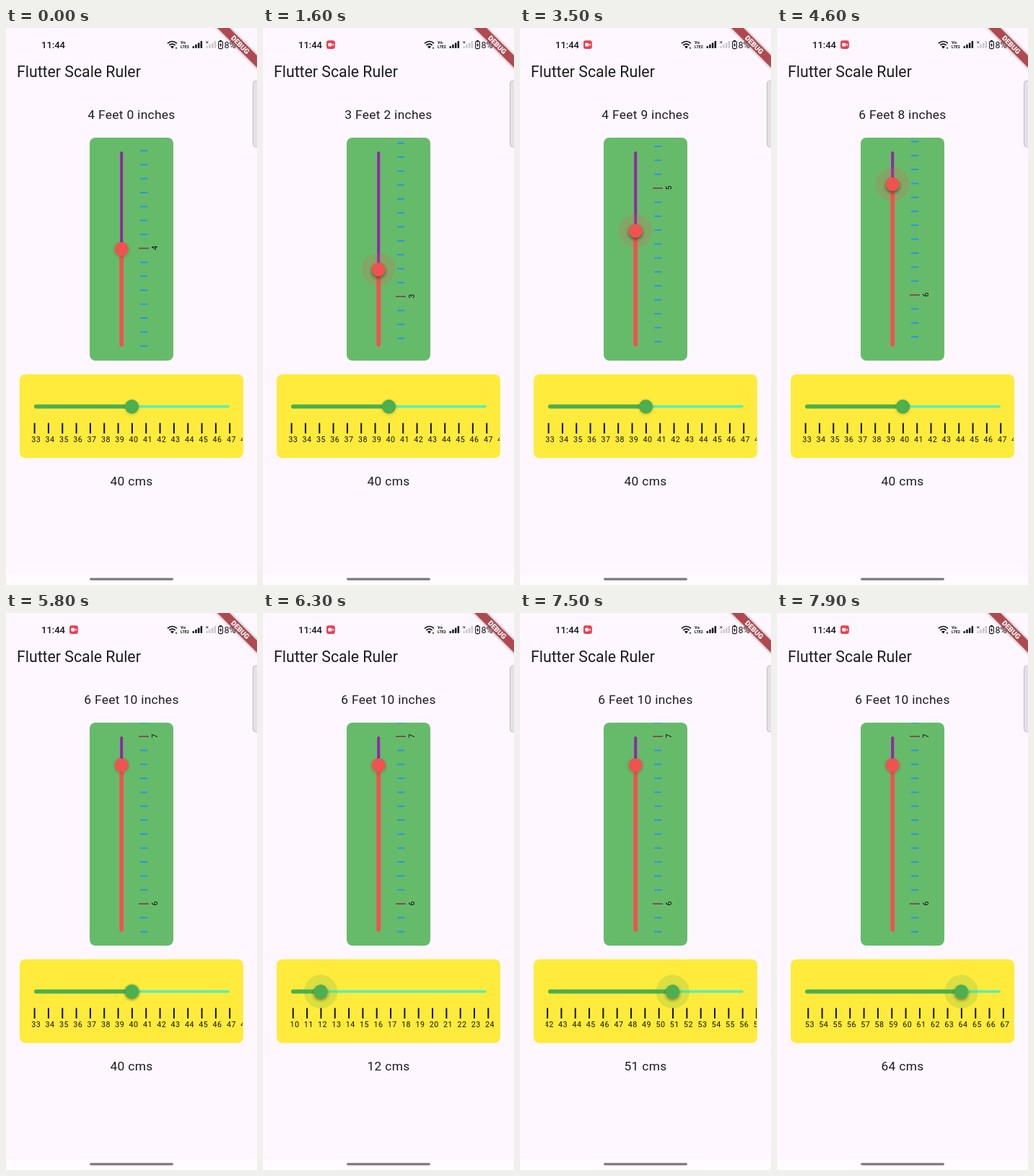
Recreate the animation shown at these times as an HTML page. Size 348 px wide and 772 px high, loop 8 s.

```html
<!DOCTYPE html>
<html lang="en">
<head>
<meta charset="utf-8">
<title>Scale ruler</title>
<style>
  html, body { margin: 0; width: 100%; height: 100%; overflow: hidden; background: #fef7ff; }
  svg { display: block; width: 348px; height: 772px; font-family: Roboto, sans-serif; }
  .value { font-size: 17.4px; letter-spacing: .3px; text-anchor: middle; fill: #1d1b20; }
  .mark { font-size: 10.7px; letter-spacing: .5px; text-anchor: middle; fill: #111; }
</style>
</head>
<body>
<svg viewBox="0 0 348 772" xmlns="http://www.w3.org/2000/svg">
  <defs>
    <clipPath id="feetClip"><rect x="116" y="152" width="116" height="292"/></clipPath>
    <clipPath id="cmClip"><rect x="35.5" y="480" width="292.5" height="116"/></clipPath>
    <filter id="blur" x="-50%" y="-50%" width="200%" height="200%"><feGaussianBlur stdDeviation="2"/></filter>
  </defs>
  <rect width="348" height="772" fill="#fef7ff"/>
  <rect y="757" width="348" height="15" fill="#fffbff"/>

  <!-- status bar -->
  <g fill="#161418">
    <text x="49" y="28.2" font-size="13" font-weight="500">11:44</text>
    <g fill="none" stroke="#161418" stroke-width="1.6">
      <path d="M224 21.4Q230.500 15.600 237 21.400M226.300 23.900Q230.500 20.200 234.700 23.900"/>
    </g>
    <path d="M228 25.800Q230.500 23.800 233 25.800L230.500 28.500Z"/>
    <circle cx="236" cy="27.800" r="1"/>
    <g font-size="5.8" font-weight="700">
      <text x="242" y="22.300">Vo</text>
      <text x="242" y="28.300" font-size="5.400">LTE2</text>
    </g>
    <g id="bars"></g>
    <path d="M277.300 18.300l3 3m0-3l-3 3" stroke="#161418" stroke-width=".9"/>
    <rect x="294.600" y="18.600" width="5.800" height="10" rx="1.500" fill="none" stroke="#161418" stroke-width="1.100"/>
    <rect x="296.200" y="16.900" width="2.600" height="1.500"/>
    <path d="M298 20.300l-2.200 3.700h1.500l-.5 3 2.400-3.900h-1.500z"/>
    <text x="302.500" y="28.200" font-size="12.500">8%</text>
  </g>
  <g id="rec">
    <rect x="88" y="17.300" width="11.800" height="11.800" rx="3" fill="#ee3d4f"/>
    <rect x="90.300" y="20.800" width="5" height="4.800" rx="1" fill="#fff"/>
    <path d="M95.600 23.200l2.200-1.700v3.400z" fill="#fff"/>
  </g>

  <text x="15" y="68.300" font-size="21.270" fill="#1d1b20">Flutter Scale Ruler</text>
  <rect x="342.500" y="73" width="12" height="92" rx="4" fill="#e4e0e5" stroke="#c3bfc4"/>

  <!-- feet ruler -->
  <text id="feetText" class="value" x="174" y="126"/>
  <rect x="116" y="152" width="116" height="309" rx="8" fill="#66bb6a"/>
  <g id="feetTicks" clip-path="url(#feetClip)"></g>
  <g id="feetSlider"></g>

  <!-- centimetre ruler -->
  <rect x="19" y="480" width="310" height="116" rx="8" fill="#ffeb3b"/>
  <g id="cmTicks" clip-path="url(#cmClip)"></g>
  <g id="cmSlider"></g>
  <text id="cmText" class="value" x="174" y="634"/>

  <rect x="116" y="762.200" width="116" height="3.300" rx="1.650" fill="#7d797f"/>

  <!-- corner ribbon -->
  <g transform="translate(348 0) rotate(45)">
    <rect x="-45" y="27" width="90" height="11.700" fill="#000" opacity=".4" filter="url(#blur)"/>
    <rect x="-45" y="27" width="90" height="11.700" fill="#b0494f"/>
    <text y="36.400" font-size="9.860" font-weight="900" fill="#fff" text-anchor="middle">DEBUG</text>
  </g>
</svg>
<script>
const $ = id => document.getElementById(id);
const LOOP = 8000, STEP = 100, GAP = 19.33;

// [time, value] stops of each drag
const feetDrag = [[1200, 48], [1500, 42], [2200, 13], [2500, 8], [2700, 8],
  [3000, 24], [3500, 57], [3900, 67], [4600, 80], [5000, 82]];
const cmDrag = [[5800, 40], [6000, 31], [6300, 12], [6500, 9], [6600, 9], [7100, 37], [7900, 64]];

function valueAt(stops, t) {
  if (t <= stops[0][0]) return stops[0][1];
  for (let i = 1; i < stops.length; i++) {
    const [t0, a] = stops[i - 1], [t1, b] = stops[i];
    if (t <= t1) return Math.round(a + (b - a) * (t - t0) / (t1 - t0));
  }
  return stops[stops.length - 1][1];
}

const clamp = x => Math.max(0, Math.min(1, x));
const press = (t, on, off) => Math.min(clamp((t - on + 100) / 200), clamp((off - t) / 200));

const line = (x1, y1, x2, y2, color, w, cap = 'butt') =>
  `<path d="M${x1} ${y1}L${x2} ${y2}" stroke="${color}" stroke-width="${w}" stroke-linecap="${cap}"/>`;

function knob(x, y, color, p) {
  const halo = p ? `<circle cx="${x}" cy="${y}" r="${23.2 * p}" fill="${color}" opacity=".2"/>` : '';
  const shade = `<circle cx="${x}" cy="${y + 1 + 1.5 * p}" r="9.8" opacity="${.2 + .2 * p}" filter="url(#blur)"/>`;
  return `${halo}${shade}<circle cx="${x}" cy="${y}" r="9.7" fill="${color}"/>`;
}

function drawFeet(v, p) {
  const y = 441 - v * 270 / 96;
  let out = '';
  for (let i = Math.max(0, v - 15); i <= Math.min(96, v + 15); i++) {
    const ty = y - .6 - (i - v) * GAP;
    if (ty < 151 || ty > 446) continue;
    if (i % 12) out += line(186, ty, 196.2, ty, '#2b95e0', 2);
    else out += line(184, ty, 198, ty, '#7d4b46', 1.8) +
      `<text class="mark" transform="translate(210 ${ty - .8}) rotate(-90)">${i / 12}</text>`;
  }
  $('feetTicks').innerHTML = out;
  $('feetSlider').innerHTML = line(160.2, 173, 160.2, y, '#9127a8', 4, 'round') +
    line(160.2, 438.8, 160.2, y, '#ef5350', 5.8, 'round') + knob(160.2, y + .5, '#ef5350', p);
  $('feetText').textContent = `${Math.floor(v / 12)} Feet ${v % 12} inches`;
}

function drawCm(v, p) {
  const x = 39.3 + v * 270 / 80;
  let out = '';
  for (let i = Math.max(0, v - 15); i <= Math.min(80, v + 15); i++) {
    const tx = x + .6 + (i - v) * GAP;
    out += line(tx, 547.5, tx, 562, '#111', 2) +
      `<text class="mark" x="${tx + 2.2}" y="574">${i}</text>`;
  }
  $('cmTicks').innerHTML = out;
  $('cmSlider').innerHTML = line(x, 524.6, 308, 524.6, '#5cefb4', 3.9, 'round') +
    line(41.8, 524.6, x, 524.6, '#4caf50', 5.8, 'round') + knob(x + .2, 524.8, '#4caf50', p);
  $('cmText').textContent = `${v} cms`;
}

function draw(time) {
  const t = Math.floor(time % LOOP / STEP) * STEP;
  $('rec').style.display = t < 100 ? 'none' : '';
  drawFeet(valueAt(feetDrag, t), press(t, 600, 5100));
  drawCm(valueAt(cmDrag, t), press(t, 5800, 9000));
}

// signal strength: full on the first card, faint on the second
for (let i = 0; i < 4; i++) {
  const h = 3 + i * 2.3;
  $('bars').innerHTML += [[258.5, '#161418'], [277.5, '#cdc8ce']].map(([x, c]) =>
    `<rect x="${x + i * 3.7}" y="${28 - h}" width="2.5" height="${h}" rx=".7" fill="${c}"/>`).join('');
}

const start = performance.now();
function tick() {
  draw(performance.now() - start);
  requestAnimationFrame(tick);
}
draw(0);
requestAnimationFrame(tick);
</script>
</body>
</html>
```
